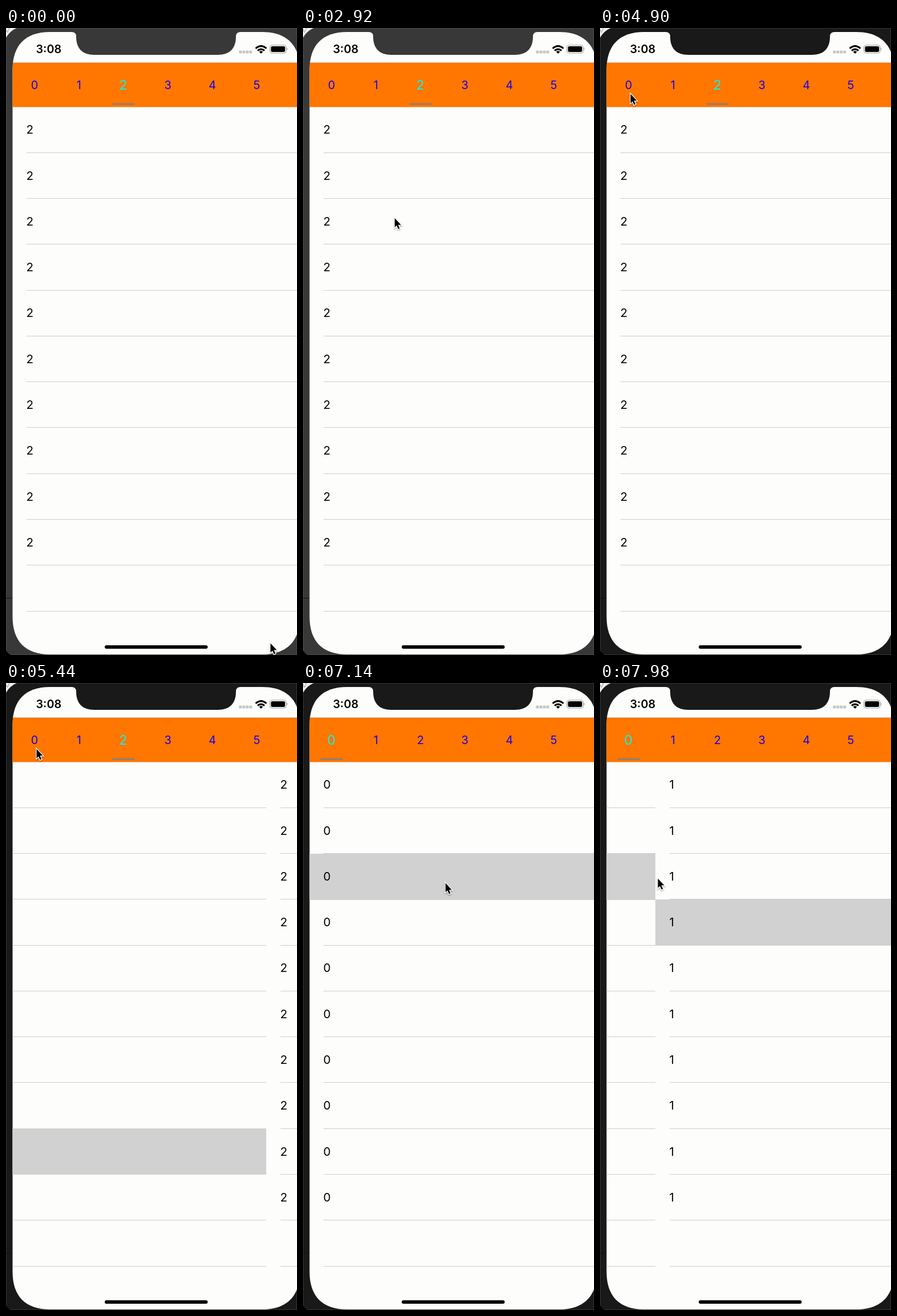
Animation, 510 px wide and 1098 px high, one loop 8 s. Source, as an HTML page:

```html
<!DOCTYPE html>
<html lang="en">
<head>
<meta charset="utf-8">
<title>Paged list</title>
<style>
  html, body { margin: 0; width: 100%; height: 100%; overflow: hidden; background: #f0f0f0; }
  svg { display: block; width: 100vw; height: 100vh; }
  text { font-family: Inter, Roboto, sans-serif; }
</style>
</head>
<body>
<svg id="stage" viewBox="0 0 510 1098">
  <defs>
    <clipPath id="screen">
      <path d="M11.5 73C11.5 30 34 7 77 7H449C492 7 515 30 515 73V1031C515 1074 492 1097 449 1097H77C34 1097 11.5 1074 11.5 1031Z"/>
    </clipPath>
    <filter id="soft" x="-50%" y="-50%" width="200%" height="200%">
      <feDropShadow dx="0" dy="1.5" stdDeviation="1.2" flood-opacity=".4"/>
    </filter>
  </defs>
  <rect width="510" height="1098" fill="#f0f0f0"/>
  <path d="M-1 0L2.5 8L6 0" fill="none" stroke="#999"/>
  <path class="bezel" d="M0 17Q7 5 19 0H510V1098H0Z" stroke="#777" stroke-width=".6"/>
  <path d="M0 998.5H11" stroke="#111"/>
  <path d="M0 1090Q3 1095 8 1098H0Z"/>
  <g clip-path="url(#screen)">
    <rect x="11" y="7" width="504" height="1090" fill="#fdfdfb"/>
    <g id="pages"></g>
    <rect x="11" y="60" width="504" height="1" fill="#c9c2ba"/>
    <rect x="11" y="61" width="504" height="77.5" fill="#ff7600"/>
    <g id="tabs"></g>
    <rect id="bar" y="132" width="39.5" height="2.6" rx="1" fill="#808080"/>
    <text x="52.5" y="44.3" font-size="19.8" font-weight="600">3:08</text>
    <g fill="#c6c6c6" id="dots"></g>
    <g fill="none" stroke="#000" stroke-width="3.1">
      <path d="M437.6 35.8Q447 27.4 456.4 35.8"/>
      <path d="M441 39.7Q447 34.4 453 39.7"/>
    </g>
    <path d="M443.6 41.6Q447 38.8 450.4 41.6L447 45Z"/>
    <rect x="462.5" y="30" width="28.5" height="14" rx="4" fill="none" stroke="#999" stroke-width="1.1"/>
    <rect x="464.4" y="31.9" width="24.7" height="10.2" rx="2.4"/>
    <path d="M492.3 34.8Q494.6 37 492.3 39.2Z" fill="#888"/>
    <rect x="173" y="1081" width="180.5" height="6" rx="3"/>
  </g>
  <path class="bezel" d="M115 6V7Q123 7 123 15C123 36 134 47 155 47H371C392 47 403 36 403 15Q403 7 411 7V6Z"/>
  <path id="cursor" d="M.5 .5V16.7L4 13.4L6.7 19.6L9.2 18.5L6.6 12.3H11.6Z" stroke="#fff" stroke-width="2.4" paint-order="stroke" filter="url(#soft)"/>
</svg>
<script>
const LOOP = 8000, LEFT = 11, WIDTH = 504, TOP = 138, ROW = 80.27;
const $ = id => document.getElementById(id);

function add(parent, tag, attrs, label) {
  const el = document.createElementNS("http://www.w3.org/2000/svg", tag);
  for (const key in attrs) el.setAttribute(key, attrs[key]);
  if (label !== undefined) el.textContent = label;
  parent.appendChild(el);
  return el;
}

function makePage() {
  const group = add($("pages"), "g", {});
  for (let i = 0; i < 11; i++) {
    add(group, "rect", { x: 25, y: Math.round(TOP - .4 + ROW * (i + 1)), width: WIDTH - 25, height: 1, fill: "#cdcdd3" });
  }
  const mark = add(group, "rect", { width: WIDTH, height: 81, fill: "#d1d1d1" });
  const labels = [];
  for (let i = 0; i < 10; i++) {
    labels.push(add(group, "text", { x: 24.5, y: 185.4 + ROW * i, "font-size": 20.7 }));
  }
  return (x, name, row) => {
    group.setAttribute("transform", `translate(${x} 0)`);
    labels.forEach(el => el.textContent = name);
    mark.setAttribute("visibility", row < 0 ? "hidden" : "visible");
    mark.setAttribute("y", Math.round(TOP + ROW * Math.max(row, 0)));
  };
}

const setLeft = makePage(), setRight = makePage();
const tabs = Array.from({ length: 6 }, (_, i) =>
  add($("tabs"), "text", { x: 50 + 77.9 * i, "text-anchor": "middle" }, i));
for (let i = 0; i < 4; i++) {
  add($("dots"), "rect", { x: 408.3 + 6 * i, y: 39.6, width: 5, height: 5, rx: 1 });
}

// Steps come in threes: two short holds, then a long one.
function stepAt(t) {
  const s = t + 20, r = s % 140;
  return 3 * Math.floor(s / 140) + (r < 20 ? 0 : r < 40 ? 1 : 2);
}

const smooth = p => (1 - Math.cos(Math.PI * p)) / 2;
const rush = p => p * p;

// Pointer stops: step, x, y, easing of the way there
const stops = [
  [1, 463, 1077], [35, 315, 642], [41, 303, 622], [45, 303, 622],
  [78, 53, 115], [119, 53, 115], [135, 251, 350], [153, 251, 350],
  [163, 76, 335, rush], [172, 101, 342]
];

function pointerAt(n) {
  const k = Math.max(1, stops.findIndex(s => s[0] >= n));
  const [n0, x0, y0] = stops[k - 1], [n1, x1, y1, ease = smooth] = stops[k];
  const p = ease(Math.max(0, (n - n0) / (n1 - n0)));
  return [x0 + (x1 - x0) * p, y0 + (y1 - y0) * p];
}

const FOCUS = 106, TAP = 110, ARRIVE = 119, PICK = 142, DRAG = 153, RELEASE = 163;

// Left edge of the right-hand page
function edgeAt(n, pointerX) {
  if (n < TAP) return LEFT;
  if (n < ARRIVE) return LEFT + WIDTH * smooth((n - TAP) / (ARRIVE - TAP));
  if (n < DRAG) return LEFT + WIDTH;
  if (n <= RELEASE) return LEFT + WIDTH - Math.max(0, 235 - pointerX);
  return LEFT + 345 * Math.pow(.857, n - RELEASE);
}

function draw(t) {
  const n = stepAt(t), [x, y] = pointerAt(n);
  const edge = edgeAt(n, x), arrived = n >= ARRIVE, active = arrived ? 0 : 2;
  setLeft(edge - WIDTH, 0, n < PICK ? 8 : 2);
  setRight(edge, arrived ? 1 : 2, arrived ? 3 : -1);
  tabs.forEach((el, i) => {
    const on = i === active;
    el.setAttribute("x", 50 + 77.9 * i - (on ? .4 : 0));
    el.setAttribute("font-size", on ? 23.5 : 20);
    el.setAttribute("fill", on ? "#10f4e4" : "#1c00e4");
    el.setAttribute("y", on ? 108.2 : 106.7);
  });
  $("bar").setAttribute("x", 30.5 + 77.9 * active);
  document.querySelectorAll(".bezel").forEach(el =>
    el.setAttribute("fill", n < FOCUS ? "#383838" : "#191919"));
  $("cursor").setAttribute("transform", `translate(${x} ${y})`);
}

const start = performance.now();
function tick() {
  draw((performance.now() - start) % LOOP);
  requestAnimationFrame(tick);
}
draw(0);
requestAnimationFrame(tick);
</script>
</body>
</html>
```
